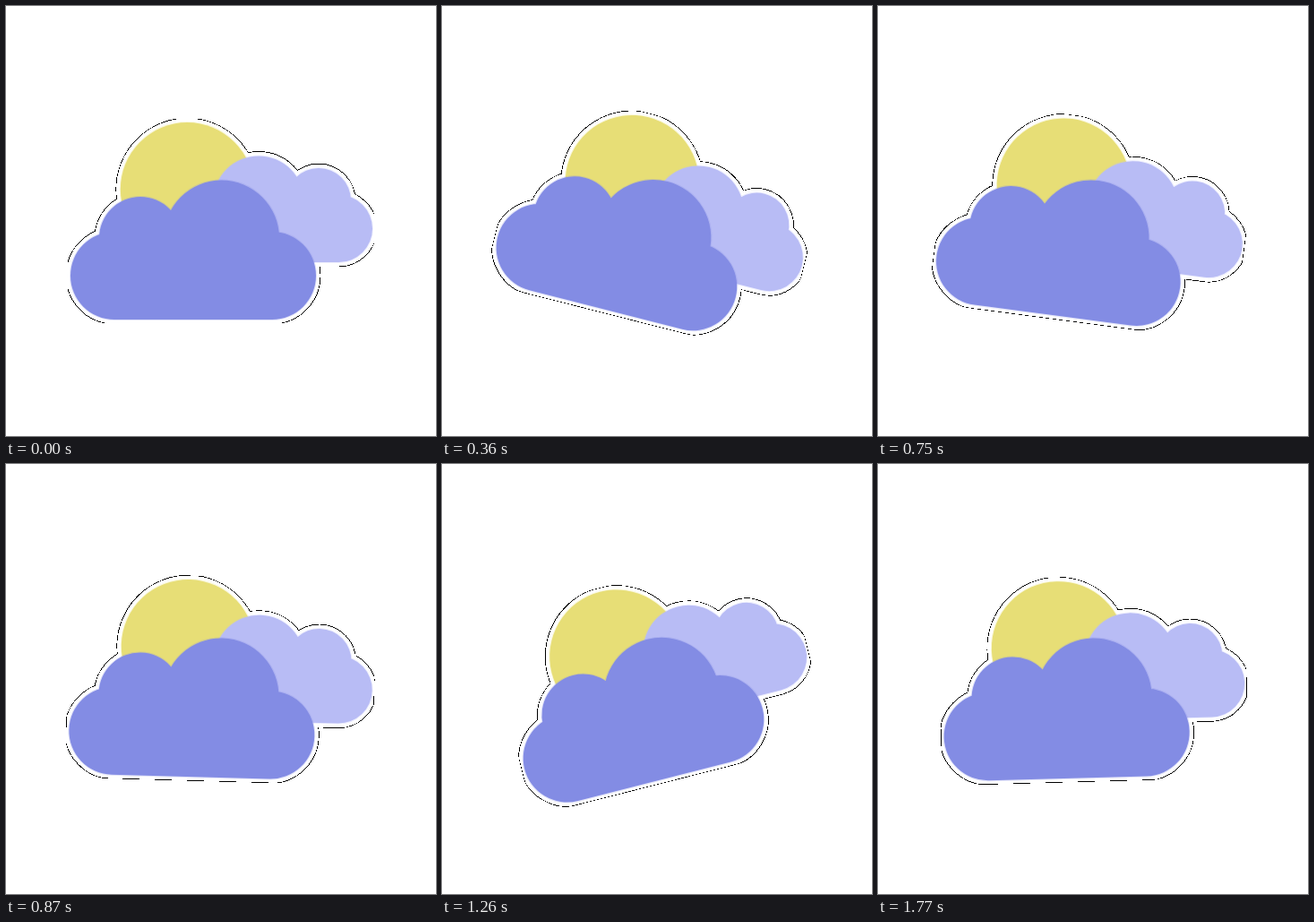
An HTML page with a canvas for the animation above (1800 ms loop, 480x480 px).

```html
<!DOCTYPE html>
<html lang="en">
<head>
<meta charset="utf-8">
<title>Swaying clouds</title>
<style>
  html, body { margin: 0; width: 100%; height: 100%; overflow: hidden; background: #fff; }
  canvas { display: block; width: 480px; height: 480px; }
</style>
</head>
<body>
<canvas id="stage" width="480" height="480"></canvas>
<script>
const SIZE = 480, LOOP = 1800, STEP = 30, SWING = 15;
const ctx = document.getElementById('stage').getContext('2d', { willReadFrequently: true });

// Each shape: circles [x, y, r] and an optional body rectangle [x, y, w, h].
function makeShape(color, circles, body) {
  const path = new Path2D();
  for (const [x, y, r] of circles) {
    path.moveTo(x + r, y);
    path.arc(x, y, r, 0, Math.PI * 2);
  }
  if (body) path.rect(...body);
  return { color, path };
}

const shapes = [
  makeShape('#e7de76', [[202.3, 204.6, 74.5]]),
  makeShape('#b8bcf5',
    [[282, 218, 50.5], [349, 217, 36], [371.5, 248.5, 37.5]],
    [282, 218, 89.5, 68]),
  makeShape('#838ce4',
    [[121, 301, 49], [150, 259, 46], [240.5, 259, 64.5], [297, 301, 49]],
    [121, 259, 176, 91])
];

const silhouette = new Path2D();
for (const { path } of shapes) silhouette.addPath(path);

function stroke(path, color, width, alpha) {
  ctx.globalAlpha = alpha;
  ctx.strokeStyle = color;
  ctx.lineWidth = width;
  ctx.stroke(path);
  ctx.globalAlpha = 1;
}

// Faint edge pixels turn black, stronger ones turn solid white.
function hardenEdge() {
  const image = ctx.getImageData(0, 0, SIZE, SIZE);
  const px = image.data;
  for (let i = 0; i < px.length; i += 4) {
    const alpha = px[i + 3];
    if (alpha === 0 || alpha === 255) continue;
    const tone = alpha < 160 ? 0 : 255;
    px[i] = px[i + 1] = px[i + 2] = tone;
    px[i + 3] = alpha < 8 ? 0 : 255;
  }
  ctx.putImageData(image, 0, 0);
}

function draw(time) {
  const t = Math.floor((time % LOOP) / STEP) * STEP;
  const angle = SWING * Math.sin(t / LOOP * Math.PI * 2);

  ctx.clearRect(0, 0, SIZE, SIZE);
  ctx.save();
  ctx.translate(SIZE / 2, SIZE / 2);
  ctx.rotate(angle * Math.PI / 180);
  ctx.translate(-SIZE / 2, -SIZE / 2);

  ctx.beginPath();
  ctx.rect(69, 126, 342, 228);
  ctx.clip();

  ctx.lineJoin = 'round';
  stroke(silhouette, '#fff', 10, 0.3);
  stroke(silhouette, '#fff', 9.2, 1);
  ctx.fillStyle = '#fff';
  ctx.fill(silhouette);
  for (const { color, path } of shapes) {
    stroke(path, color, 2, 0.25);
    ctx.fillStyle = color;
    ctx.fill(path);
  }
  ctx.restore();
  hardenEdge();
}

function tick() {
  draw(performance.now());
  requestAnimationFrame(tick);
}
tick();
</script>
</body>
</html>
```
